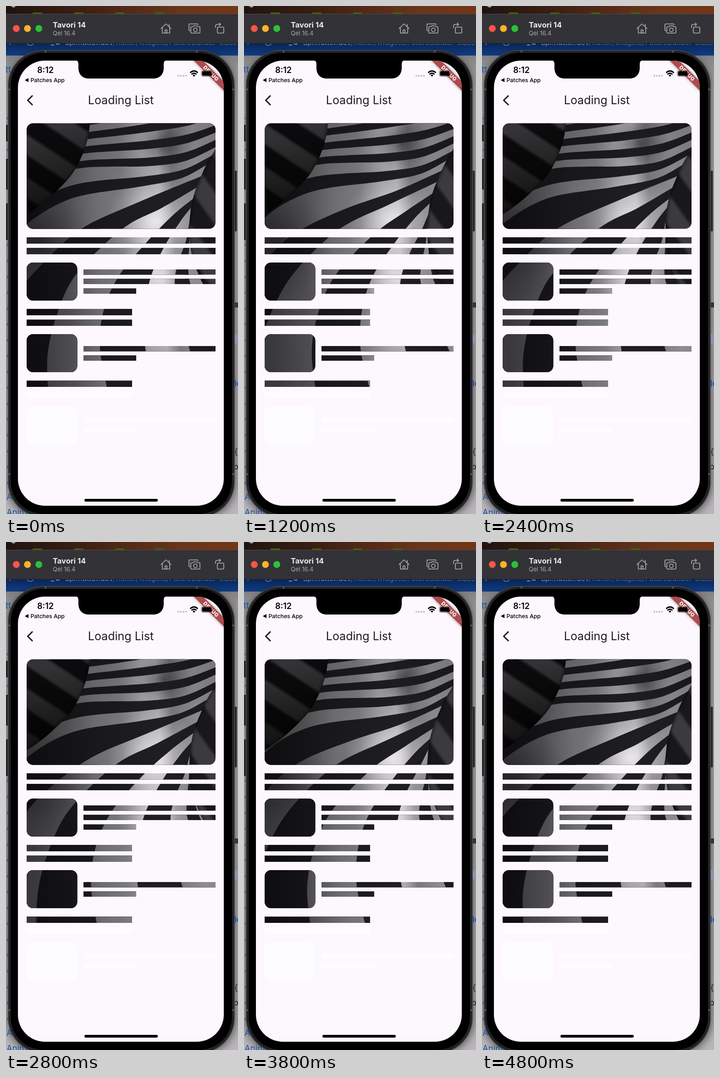
An HTML page with a canvas for the animation above (4.9 s loop, 506 by 1107 pixels).

```html
<!DOCTYPE html>
<html lang="en">
<head>
<meta charset="utf-8">
<title>Loading list</title>
<style>
  html, body { margin: 0; width: 506px; height: 1107px; overflow: hidden; background: #b3afb4; }
  svg, canvas { position: absolute; left: 0; top: 0; display: block; }
  text { font-family: Inter, "Open Sans", sans-serif; }
</style>
</head>
<body>
<svg width="506" height="1107" viewBox="0 0 506 1107">
  <defs>
    <linearGradient id="wall">
      <stop offset="0" stop-color="#20130f"/><stop offset=".3" stop-color="#3a1f14"/>
      <stop offset=".75" stop-color="#69351b"/><stop offset="1" stop-color="#743716"/>
    </linearGradient>
    <linearGradient id="browser" x2="0" y2="1">
      <stop offset="0" stop-color="#092556"/><stop offset="1" stop-color="#113d83"/>
    </linearGradient>
    <linearGradient id="shade" x2="0" y2="1">
      <stop offset="0" stop-color="#000" stop-opacity=".3"/><stop offset="1" stop-color="#000" stop-opacity="0"/>
    </linearGradient>
    <filter id="soft" x="-20%" y="-10%" width="140%" height="120%"><feGaussianBlur stdDeviation="9"/></filter>
    <filter id="blur" x="-20%" y="-60%" width="140%" height="220%"><feGaussianBlur stdDeviation="3"/></filter>
    <clipPath id="screen"><rect x="26" y="119" width="449" height="970" rx="59"/></clipPath>
  </defs>

  <!-- page behind the simulator -->
  <rect width="506" height="1107" fill="#b9b5ba"/>
  <rect y="80" width="506" height="28" fill="url(#browser)"/>
  <g font-size="16.2" fill="#8190ab">
    <text x="6" y="86" font-size="20">›</text>
    <circle cx="53" cy="79" r="7" fill="none" stroke="#53698f" stroke-width="2"/>
    <path d="M98 80h6m5 3h8M98 85h7" stroke="#8190ab" stroke-width="2"/>
    <text x="129" y="85">api.flutter.dev<tspan fill="#53698f">/flutter/widgets/FutureBuilder-class</tspan></text>
  </g>
  <rect y="108" width="506" height="75" fill="url(#shade)"/>
  <rect x="2" y="104" width="500" height="1012" rx="76" opacity=".5" filter="url(#soft)"/>
  <g id="links" font-size="18.5" fill="#1853a0">
    <text x="-1" y="145">tt</text>
    <text x="1" y="1110">Anim</text>
    <text x="498" y="829" font-weight="600">le</text>
  </g>
  <g font-size="18" fill="#1b1a1d">
    <text x="498" y="978">{</text><text x="496" y="1010">p</text>
    <rect x="499" y="646" width="7" height="11" fill="#343337"/>
    <rect x="499" y="715" width="7" height="20" fill="#8c97ab"/>
  </g>

  <!-- desktop strip and window title bar -->
  <rect width="506" height="17" fill="url(#wall)"/>
  <path d="M10 0h11q-2 4-6 3z" fill="#a7a1a0"/>
  <path d="M58 15.5h21m70 0h20m69 0h20m67 0h20" stroke="#425f0a" stroke-width="3"/>
  <rect y="17" width="506" height="64" fill="#333237"/>
  <path d="M0 17.5h506" stroke="#4b4a50"/>
  <path d="M0 81.5h506" stroke="#151b2a"/>
  <circle cx="22.5" cy="49" r="7.5" fill="#ff5349"/>
  <circle cx="46.8" cy="49" r="7.5" fill="#fdb32a"/>
  <circle cx="71.5" cy="49" r="7.5" fill="#2ac238"/>
  <text x="102" y="47" font-size="16.5" font-weight="700" fill="#eceaed">Tavori 14</text>
  <text x="102" y="64" font-size="13" fill="#aaa8ad">Qel 16.4</text>
  <g fill="none" stroke="#b5b3b8" stroke-width="1.6" stroke-linejoin="round" stroke-linecap="round">
    <path d="M338 49l11-10 11 10M341 47v12h16V47M347 59v-7h4v7M356 44v-4"/>
    <path d="M401 54q-2 0-2-2V41q0-2 2-2h16q2 0 2 2"/>
    <path d="M405 45h3l2-2h6l2 2h3q2 0 2 2v10q0 2-2 2h-16q-2 0-2-2V47q0-2 2-2z"/>
    <circle cx="413" cy="52" r="4"/>
    <path d="M463 46h10q2 0 2 2v9q0 2-2 2h-10q-2 0-2-2v-9q0-2 2-2zM457 47v-3q0-4 4-4h7m-3-3l3 3-3 3"/>
  </g>

  <!-- phone -->
  <path d="M1 259v36M1 333v67M1 430v80" stroke="#29282b" stroke-width="7"/>
  <path d="M501 359v132" stroke="#29282b" stroke-width="5"/>
  <rect x="5" y="97" width="493" height="1016" rx="76" stroke="#454548" stroke-width="2" fill="#202022"/>
  <rect x="9.5" y="101.5" width="484" height="1006" rx="72" stroke="#303033" fill="#000"/>
  <path d="M86 97v4M416 97v4M5 182h4M494 182h4M5 1020h4M494 1020h4" stroke="#555" stroke-width="4"/>
  <g clip-path="url(#screen)">
    <rect x="26" y="119" width="449" height="970" fill="#fdf8fd"/>
    <g transform="translate(447.3 146.7) rotate(45)">
      <rect x="-80" y="-7" width="160" height="14" opacity=".45" filter="url(#blur)"/>
      <rect x="-80" y="-7" width="160" height="14" fill="#ae4a4b"/>
      <text y="4.2" text-anchor="middle" font-size="11.5" font-weight="800" letter-spacing=".6" fill="#fff">DEBUG</text>
    </g>
    <path d="M150 118q8 0 8 9v8c0 14 9 23 22 23h142c13 0 22-9 22-23v-8q0-9 8-9z"/>
  </g>
  <text x="68" y="145.5" font-size="18" font-weight="600">8:12</text>
  <path d="M41 161.5l8-4.5v9z"/>
  <text x="53.5" y="166" font-size="12.3" font-weight="500">Patches App</text>
  <g fill="#c4bfc4"><circle cx="376" cy="152" r="2"/><circle cx="381.500" cy="152" r="2"/><circle cx="387" cy="152" r="2"/><circle cx="392.500" cy="152" r="2"/></g>
  <g fill="none" stroke="#000" stroke-width="2.7">
    <path d="M401.500 145.500q8.500-8 17 0M404.500 149q5.500-5 11 0"/>
    <path d="M407 151q3-2.500 6 0l-3 3z" fill="#000" stroke="none"/>
  </g>
  <rect x="426" y="140.500" width="24" height="13" rx="4" fill="none" stroke="#744"/>
  <rect x="427.500" y="142" width="21" height="10" rx="2.500"/>
  <path d="M451.500 145v4" stroke="#744" stroke-width="1.500"/>
  <path d="M58 195L47.500 205.500 58 216" fill="none" stroke="#1d1b20" stroke-width="3"/>
  <text x="250.500" y="214" text-anchor="middle" font-size="25" fill="#1d1b20">Loading List</text>
  <g fill="#fdfcff">
    <rect x="45" y="840" width="230" height="14"/>
    <rect x="45" y="872" width="110" height="83" rx="14"/>
    <rect x="169" y="897" width="288" height="12"/>
    <rect x="169" y="918" width="115" height="12"/>
  </g>
  <rect x="171" y="1074" width="160" height="6" rx="3"/>
</svg>
<canvas id="art" width="506" height="1107"></canvas>
<script>
const ctx = document.getElementById('art').getContext('2d');
const LOOP = 4900, STEP = 100, PERIOD = 4780;

const links = document.getElementById('links');
for (let y = 247; y < 1080; y += 34.55) {
  if (y > 255 && y < 300 || y > 325 && y < 515) continue;
  const link = document.createElementNS('http://www.w3.org/2000/svg', 'text');
  link.setAttribute('x', 1);
  link.setAttribute('y', y);
  link.textContent = 'A';
  links.append(link);
}

// Stripe edges of the twisted sheet: level, then points from left to right.
const edges = [
  [-10, [60,288], [130,266], [190,258], [250,249], [320,236], [400,222], [475,206]],
  [-4, [60,410], [110,368], [165,353], [230,350], [310,349], [390,338], [460,306]],
  [-2, [10,505], [60,464], [115,431], [175,411], [290,394], [380,376], [438,346]],
  [-1, [-60,840], [-25,730], [25,628], [82,559], [165,485], [290,427], [428,370]],
  [0, [92,840], [91,757], [113,667], [155,582], [255,485], [340,440], [417,395]],
  [1, [222,840], [205,747], [212,667], [245,590], [310,511], [365,455], [408,420]],
  [2, [330,840], [304,747], [303,660], [316,590], [345,525], [380,470], [403,440]],
  [3, [430,840], [400,747], [378,660], [368,600], [377,555], [393,510], [400,470]],
  [5, [640,840], [590,760], [500,680], [440,620], [418,580], [406,540], [401,500]]
];

function edgeAt(level) {
  let i = 0;
  while (i < edges.length - 2 && level > edges[i + 1][0]) i++;
  const [a, ...from] = edges[i], [b, ...to] = edges[i + 1];
  const f = (level - a) / (b - a);
  return from.map((p, j) => p.map((v, axis) => v + (to[j][axis] - v) * f));
}

// Smooth curve through the points, continuing the given path.
function trace(path, points) {
  path.lineTo(...points[0]);
  for (let i = 0; i < points.length - 1; i++) {
    const p = points[i], q = points[i + 1];
    const before = points[i - 1] || p, after = points[i + 2] || q;
    path.bezierCurveTo(
      p[0] + (q[0] - before[0]) / 6, p[1] + (q[1] - before[1]) / 6,
      q[0] - (after[0] - p[0]) / 6, q[1] - (after[1] - p[1]) / 6, ...q);
  }
}

const sheet = new Path2D();
trace(sheet, [[184,245], [179,285], [165,328], [142,369], [103,410], [62,443], [20,468]]);
sheet.lineTo(20, 850);
sheet.lineTo(640, 850);
trace(sheet, [[640,790], [500,680], [440,620], [418,580], [406,545], [400,500],
  [404,440], [412,405], [425,372], [440,340], [460,308], [500,245]]);

const slots = new Path2D();
slots.roundRect(45, 255.5, 412, 230, 14);
slots.roundRect(45, 559, 110.5, 83, 14);
slots.roundRect(45, 715, 110.5, 83, 14);
for (const [y, h, x, end] of [
  [504, 13.5, 45, 457], [527, 14, 45, 457],
  [574, 11.5, 169, 457], [594.5, 11.5, 169, 457], [615.5, 11.5, 169, 284],
  [660, 14, 45, 275], [683.5, 13.5, 45, 275],
  [741, 11.5, 169, 457], [761.5, 11.5, 169, 284], [816.5, 13.5, 45, 275]
]) slots.rect(x, y, end - x, h);

function linear(x0, y0, x1, y1, stops) {
  const g = ctx.createLinearGradient(x0, y0, x1, y1);
  stops.forEach(([at, color]) => g.addColorStop(at, color));
  return g;
}
function glow(x, y, radius, rgb, alpha) {
  const g = ctx.createRadialGradient(x, y, 0, x, y, radius);
  for (const f of [0, .35, .7, 1]) g.addColorStop(f, `rgba(${rgb},${alpha * (1 - f) ** 1.4})`);
  return g;
}

const darkFill = linear(45, 0, 457, 0, [[0, '#0d0c0e'], [.35, '#18171a'], [.7, '#1f1e21'], [1, '#1b1a1d']]);
const lightFill = linear(45, 400, 457, 380, [
  [0, '#39383a'], [.2, '#4e4d50'], [.36, '#6d6c6f'], [.5, '#7b7a7d'], [.62, '#a3a2a5'],
  [.7, '#aeadb0'], [.77, '#79787b'], [.9, '#8d8c8f'], [1, '#858487']]);
const lightExtras = [
  glow(325, 470, 105, '255,252,255', .75),
  glow(330, 590, 90, '255,252,255', .65),
  glow(345, 300, 60, '15,14,16', .5),
  glow(70, 520, 120, '8,7,9', .5)
];
const sheetShade = linear(0, 255, 0, 420, [[0, 'rgba(0,0,0,.1)'], [1, 'rgba(0,0,0,0)']]);
const leftShade = linear(90, 270, 130, 450, [[0, 'rgba(0,0,0,.05)'], [1, 'rgba(0,0,0,.75)']]);

// Soft diagonal stripes on the far sides of the sheet.
function diagonals(x, y, w, h, angle, width, phase, dark, light) {
  ctx.save();
  ctx.beginPath();
  ctx.rect(x, y, w, h);
  ctx.clip();
  ctx.translate(x, y);
  ctx.rotate(angle);
  for (let i = -6; i < 8; i++) {
    const top = (i - phase) * width;
    ctx.fillStyle = linear(0, top, 0, top + width,
      [[0, dark], [.42, dark], [.52, light], [.9, light], [1, dark]]);
    ctx.fillRect(-500, top, 1400, width + 1);
  }
  ctx.restore();
}

function draw(time) {
  const turn = time / PERIOD;
  ctx.clearRect(0, 0, 506, 1107);
  ctx.save();
  ctx.clip(slots);

  diagonals(45, 250, 160, 240, .58, 78, turn + .15, '#0c0b0d', '#363537');
  ctx.fillStyle = leftShade;
  ctx.fillRect(45, 250, 160, 240);
  diagonals(390, 290, 70, 330, .95, 84, turn + .3, '#18171a', '#3b3a3d');

  ctx.save();
  ctx.shadowColor = 'rgba(0,0,0,.8)';
  ctx.shadowBlur = 9;
  ctx.fillStyle = darkFill;
  ctx.fill(sheet);
  ctx.restore();

  ctx.clip(sheet);
  const bands = new Path2D();
  for (let n = -14; n <= 6; n += 2) {
    const start = n - 2 * turn + 2;
    if (start > 5) continue;
    const upper = edgeAt(start);
    bands.moveTo(...upper[0]);
    trace(bands, upper);
    trace(bands, edgeAt(start + 1).reverse());
    bands.closePath();
  }
  for (const fill of [lightFill, ...lightExtras]) {
    ctx.fillStyle = fill;
    ctx.fill(bands);
  }
  ctx.fillStyle = sheetShade;
  ctx.fillRect(45, 250, 412, 170);
  ctx.restore();
}

function frame(now) {
  draw(Math.floor(now % LOOP / STEP) * STEP);
  requestAnimationFrame(frame);
}
draw(0);
requestAnimationFrame(frame);
</script>
</body>
</html>
```
